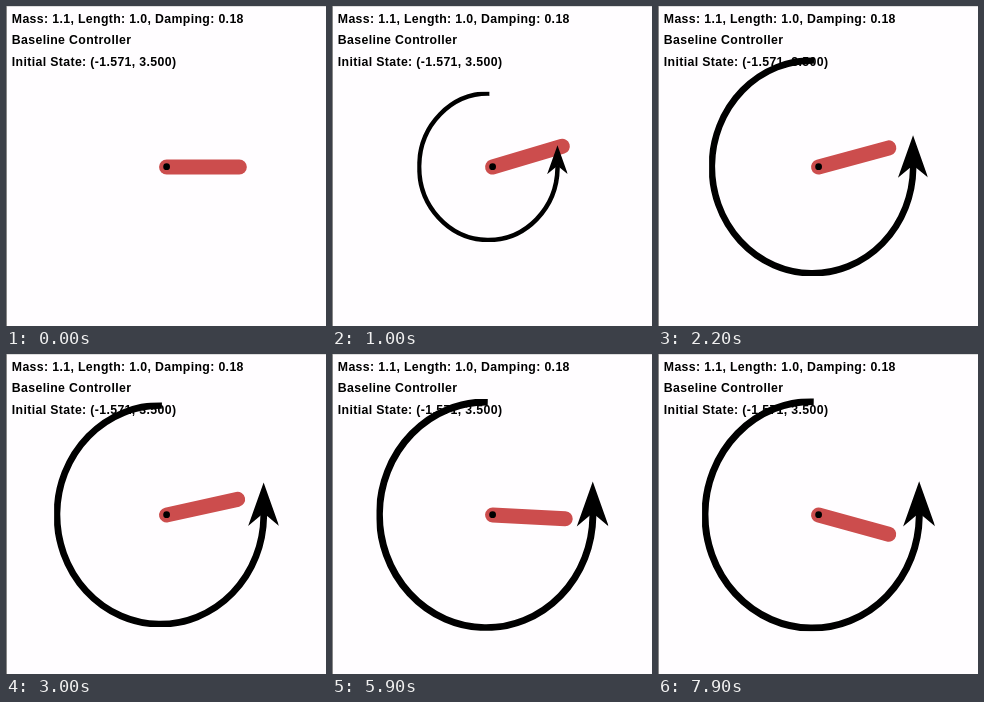
Recreate the animation shown at these times as an HTML page with a canvas. Size 320 by 320 pixels, loop 8000 ms.

```html
<!DOCTYPE html>
<html>
<head>
<meta charset="utf-8">
<title>Pendulum</title>
<style>
html, body { margin: 0; width: 100%; height: 100%; overflow: hidden; background: #fffdff; }
canvas { display: block; width: 100vw; height: 100vh; }
</style>
</head>
<body>
<canvas id="stage"></canvas>
<script>
const SIZE = 320, LOOP = 8000, STEP = 100;
const PIVOT_X = 160.6, PIVOT_Y = 161, ROD = 72.7, ROD_WIDTH = 15.1;
const LABELS = [
  'Mass: 1.1, Length: 1.0, Damping: 0.18',
  'Baseline Controller',
  'Initial State: (-1.571, 3.500)'
];

const canvas = document.getElementById('stage');
const ctx = canvas.getContext('2d');

// Rod angle in degrees: a slow sag, plus the swing that is braked early on
function angleAt(n) {
  const m = n - 14;
  const sag = 16.5 - 0.653 * m + 10.19 * (1 - Math.exp(-m / 18));
  const swing = 13.65 * Math.max(0, 1 - n / 8) ** 2.3;
  return sag - swing;
}

// Signed arrow radius: clockwise (negative) braking blends into a steady hold
function torqueAt(n) {
  if (n < 1) return 0;
  const brake = -124.5 + 1.4 * n;
  const hold = 116.5 - 11.5 * Math.exp(-(n - 14) / 15);
  const mix = 1 / (1 + Math.exp((8 - n) / 0.5));
  return brake + (hold - brake) * mix;
}

function drawRod(deg) {
  ctx.save();
  ctx.translate(PIVOT_X, PIVOT_Y);
  ctx.rotate(-deg * Math.PI / 180);
  ctx.strokeStyle = '#cc4d4d';
  ctx.lineWidth = ROD_WIDTH;
  ctx.lineCap = 'round';
  ctx.beginPath();
  ctx.moveTo(0, 0);
  ctx.lineTo(ROD, 0);
  ctx.stroke();
  ctx.restore();
}

// Drawn counter-clockwise in a unit square, mirrored for negative torque
function drawArrow(r) {
  if (!r) return;
  const s = Math.abs(r);
  ctx.save();
  ctx.translate(160.4, 160.8);
  ctx.scale(Math.sign(r) * s, s);
  ctx.beginPath();
  ctx.rect(-1, -1, 2, 2);
  ctx.clip();
  ctx.strokeStyle = ctx.fillStyle = '#000';
  ctx.lineWidth = 0.06;
  ctx.beginPath();
  ctx.ellipse(-0.054, 0, 0.921, 0.974, 0, -Math.PI / 2 + 0.015, -0.02, true);
  ctx.stroke();
  ctx.beginPath();
  ctx.moveTo(0.866, -0.288);
  ctx.lineTo(1.004, 0.1);
  ctx.lineTo(0.866, -0.015);
  ctx.lineTo(0.728, 0.1);
  ctx.closePath();
  ctx.fill();
  ctx.restore();
}

function drawAxle() {
  ctx.fillStyle = '#000';
  ctx.beginPath();
  ctx.arc(PIVOT_X, PIVOT_Y - 0.3, 3.4, 0, Math.PI * 2);
  ctx.fill();
}

function drawLabels() {
  ctx.fillStyle = '#000';
  ctx.font = 'bold 12.3px "Liberation Sans", Arial, sans-serif';
  ctx.letterSpacing = '0.36px';
  LABELS.forEach((text, i) => ctx.fillText(text, 5.8, 17 + i * 21.3));
}

function drawBackdrop() {
  ctx.fillStyle = '#fffdff';
  ctx.fillRect(0, 0, SIZE, SIZE);
  ctx.fillStyle = '#ddd';
  ctx.fillRect(0, 0, SIZE, 1);
  ctx.fillStyle = '#888';
  ctx.fillRect(0, 0, 1, SIZE);
}

function draw(now) {
  const n = Math.max(0, Math.floor((now % LOOP) / STEP) - 1);
  const w = Math.round(innerWidth * devicePixelRatio);
  const h = Math.round(innerHeight * devicePixelRatio);
  if (canvas.width !== w || canvas.height !== h) {
    canvas.width = w;
    canvas.height = h;
  }
  ctx.setTransform(w / SIZE, 0, 0, h / SIZE, 0, 0);
  drawBackdrop();
  drawRod(angleAt(n));
  drawArrow(torqueAt(n));
  drawAxle();
  drawLabels();
}

const start = performance.now();
function tick() {
  draw(performance.now() - start);
  requestAnimationFrame(tick);
}
tick();
</script>
</body>
</html>
```
